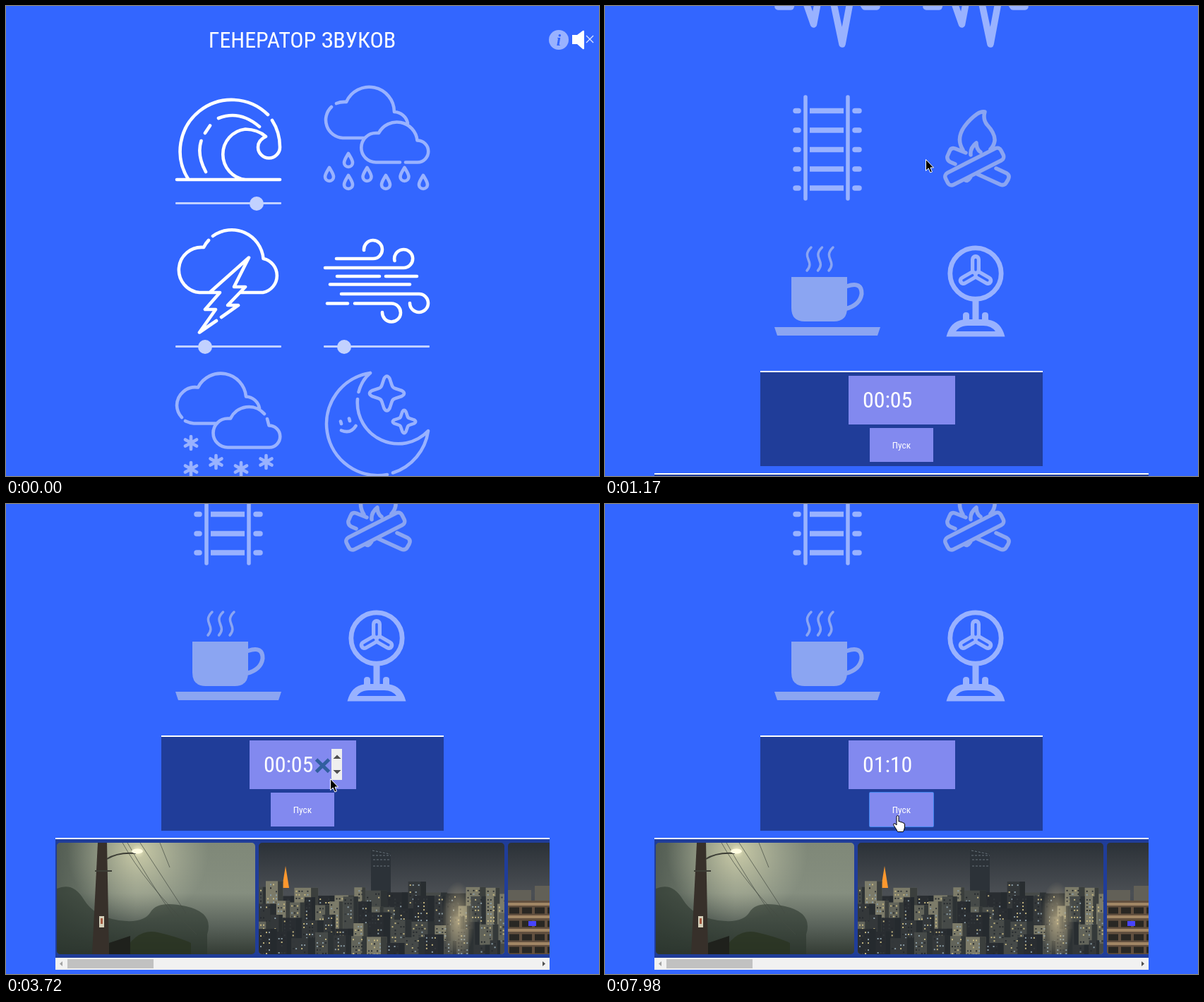
An HTML page for the animation above (8000 ms loop, 840x666 px).

```html
<!DOCTYPE html>
<html lang="ru">
<head>
<meta charset="utf-8">
<title>Генератор звуков</title>
<style>
  html, body { margin: 0; width: 100%; height: 100%; overflow: hidden; background: #36f; }
  svg { display: block; }
  text { font-family: "Roboto Condensed", Roboto, sans-serif; font-stretch: 75%; fill: #fff; }
  .line { fill: none; stroke-width: 4.6; stroke-linecap: round; stroke-linejoin: round; }
  .on { stroke: #fff; }
  .dim { stroke: #99b2ff; }
  .label { font: bold 11.4px "Noto Sans Mono", "DejaVu Sans Mono", monospace; fill: #99b2ff; }
  .digits { font-size: 32px; text-anchor: middle; }
  .soft { stroke: #8ba5f2; }
  .focus { fill: none; stroke: #3f86ee; }
</style>
</head>
<body>
<svg width="840" height="666" viewBox="0 0 840 666">
<defs>
  <path id="drop" d="M0-9C3-4 6 0 6 4A6 6 0 0 1-6 4C-6 0-3-4 0-9Z"/>
  <path id="flake" d="M0-9V9M-8-4.6L8 4.6M-8 4.6L8-4.6"/>
  <path id="star" vector-effect="non-scaling-stroke" d="M-4-21Q0-28 4-21L7-12Q8-8 12-7L21-4Q28 0 21 4L12 7Q8 8 7 12L4 21Q0 28-4 21L-7 12Q-8 8-12 7L-21 4Q-28 0-21-4L-12-7Q-8-8-7-12Z"/>
  <path id="noise" class="line dim" style="stroke-width:9.5" d="M455 551H473L484.500 516 505.500 576 522 490 546 604 561 524 578 551H595"/>
  <path id="steam" d="M292 342C277 357 298 361 286 375"/>
  <linearGradient id="fog" x2="0" y2="1"><stop stop-color="#7f8878"/><stop offset=".45" stop-color="#858e7f"/><stop offset=".75" stop-color="#59625a"/><stop offset="1" stop-color="#343c34"/></linearGradient>
  <linearGradient id="shade"><stop stop-color="#2f3a34" stop-opacity=".55"/><stop offset=".4" stop-color="#2f3a34" stop-opacity="0"/></linearGradient>
  <radialGradient id="glow"><stop stop-color="#fffbd0" stop-opacity=".9"/><stop offset=".1" stop-color="#e4e2b8" stop-opacity=".65"/><stop offset="1" stop-color="#c8ccb0" stop-opacity="0"/></radialGradient>
  <linearGradient id="sky" x2="0" y2="1"><stop stop-color="#2b3137"/><stop offset=".45" stop-color="#4b4f54"/><stop offset="1" stop-color="#34363a"/></linearGradient>
  <radialGradient id="street"><stop stop-color="#d9c79a" stop-opacity=".7"/><stop offset="1" stop-color="#d9c79a" stop-opacity="0"/></radialGradient>
  <clipPath id="frames"><rect x="72" y="480" width="281" height="158" rx="5"/><rect x="358" y="480" width="348" height="158" rx="5"/><path d="M770 480H716Q711 480 711 485V633Q711 638 716 638H770Z"/></clipPath>
</defs>

<g id="page">
  <text x="419.500" y="59" font-size="32" text-anchor="middle">ГЕНЕРАТОР ЗВУКОВ</text>
  <circle cx="783" cy="48" r="14" fill="#99b2ff"/>
  <text x="783" y="56" text-anchor="middle" style="font:italic bold 23px 'Liberation Serif',serif;fill:#36f">i</text>
  <path fill="#fff" d="M802 41H809L817 35Q819 34 819 36V60Q819 62 817 61L809 54H802Z"/>
  <path stroke="#dde6ff" stroke-width="1.300" d="M822 42L832 52M832 42L822 52"/>

  <!-- wave, storm, wind -->
  <path class="line on" d="M242 246H388M258 245A73 73 0 0 1 371 154M377 162Q388 179 388 200A15.500 15.500 0 0 1 357 200Q357 190 368 185Q357 175 339 174.500A36 36 0 0 0 339 246M283 235Q270 211 276.500 191M282 180L289 169.500M301 159Q331 147 359 171"/>
  <path class="line on" d="M287 332Q283 336 280 342A32 32 0 1 0 274 406H303L282 430H297L274 462.500 298 446M305 441L329 424H314L339 398H323L344 356.500 289 405.500M293 326A45 45 0 0 1 364.500 358A24.500 24.500 0 0 1 364 406H333"/>
  <path class="line on" d="M468 358H520A13 13 0 1 0 507 346M452 371H563A13 13 0 1 0 550.500 361M469 383H529M538 383H582M459 394.500H572M475 408H585A13 13 0 1 1 572 421M455 421.500H484M494 421.500H546A13 13 0 1 1 533 434"/>
  <g id="sliders" fill="#c2d1ff"></g>

  <!-- rain, snow, moon -->
  <g class="line dim">
    <path d="M508 187H477A25.500 25.500 0 0 1 461 143M468 138Q474 135.500 482 136A35.500 35.500 0 0 1 550 150A20 20 0 0 1 569 166M558 221.500H524A20.500 20.500 0 0 1 524 180H528A29 29 0 0 1 582.500 190.500A15.500 15.500 0 0 1 583 221.500H566"/>
    <g id="drops"></g>
    <path d="M299 591.500H266Q260 591 254 588M249 583A26 26 0 0 1 242 566A26 26 0 0 1 272 540.500A36 36 0 0 1 340 553.500A20 20 0 0 1 359 570M370 585L372.500 594.500A15.500 15.500 0 0 1 373 625.500H314A20.500 20.500 0 0 1 314 584.500H318A29 29 0 0 1 366 578"/>
    <g id="flakes"></g>
    <path d="M516 520A73 73 0 1 0 540 664M548 661.500A73 73 0 0 0 598 602A58 58 0 0 1 498 557M499.500 547Q504 530 516 520M474 588.500L475 592M486 584.500L487 588M475 601.500Q488 607 495.500 595"/>
    <use href="#star" x="539.500" y="549"/>
    <use href="#star" transform="translate(564 589)scale(.66)"/>
  </g>

  <!-- hail and noise -->
  <g transform="translate(0 249)">
    <g class="line dim">
      <path d="M249.500 510Q258 499.500 279 499A45 45 0 0 1 364 516A24.500 24.500 0 0 1 364 564H274A32 32 0 0 1 246 517M376.500 584A9 9 0 1 0 372.500 589.700"/>
      <g id="hail"></g>
    </g>
    <g id="noises"></g>
  </g>

  <!-- rails, campfire, cup, fan -->
  <g transform="translate(0 1002)">
    <g class="line dim">
      <path style="stroke-width:5.500" d="M284 129V273M344 129V273"/>
      <g id="rungs" stroke-width="7.500"></g>
    </g>
    <g class="line soft" stroke-width="5">
      <path style="stroke-width:5.500" d="M507 204Q497 188 509 171Q517 160 527 153Q533 149 538 150Q535 160 541 168Q553 181 552 191Q551 198 546 203M518 211Q517 201 526 194Q526 203 532 207M511 208L496 202Q490 200 488 206L485 213Q484 218 489 221L496 224M554 230L569 237Q574 240 571 246L568 251Q565 255 560 253L527 238"/>
      <rect x="-44" y="-10" width="88" height="19" rx="6" style="stroke-width:5.500" transform="translate(523.500 228)rotate(-27)"/>
      <path d="M509 246Q513 251 518 243"/>
    </g>
    <path fill="#8ba5f2" d="M264 384H343V428Q343 447 324 447H283Q264 447 264 428ZM240 455H390L386 467H244Z"/>
    <g class="line soft">
      <path style="stroke-width:6" d="M343 397Q364 390 363.500 408Q361 424 341 429"/>
      <g style="stroke-width:3.500"><use href="#steam"/><use href="#steam" x="15.500"/><use href="#steam" x="31"/></g>
    </g>
    <circle class="dim" cx="525" cy="379" r="36.200" fill="none" stroke-width="6.800"/>
    <g id="blades" transform="translate(525 379)" stroke-linecap="round"></g>
    <path fill="#99b2ff" fill-rule="evenodd" d="M520.500 417H529.500V444H534V438Q534 434 538.500 434T543 438V444.500Q561 447 566.500 468.500H483.500Q489 447 507 444.500V438Q507 434 511.500 434T516 438V444H520.500ZM497 461H553Q547 453 536 453H514Q503 453 497 461Z"/>
  </g>

  <!-- timer and photo strip -->
  <g transform="translate(0 1191)">
    <path fill="#203d99" d="M220 330H620V463H220ZM70 475H770V660H70Z"/>
    <path fill="#fff" d="M220 328H620V330H220ZM70 473H770V475H70Z"/>
    <path fill="#8289ef" d="M345 335H496V404H345ZM375 409H465V457H375Z"/>
    <rect id="inputFocus" class="focus" x="344.500" y="334.500" width="152" height="70"/>
    <rect id="buttonFocus" class="focus" x="374.500" y="408.500" width="91" height="49" rx="1"/>
    <rect id="selection" y="350" width="31" height="39" fill="#b3d7ff"/>
    <g class="digits">
      <text id="minutes" x="380.700" y="380"></text><text x="400.300" y="380">:</text><text id="seconds" x="419.500" y="380"></text>
    </g>
    <g id="controls">
      <path stroke="#315f9f" stroke-width="5" d="M439.500 362L457.500 379.500M457.500 362L439.500 379.500"/>
      <path fill="#efefef" d="M461 347H476V391H461Z"/>
      <path fill="#505050" d="M463.500 361L469 355.500 474.500 361ZM463.500 377L469 382.500 474.500 377Z"/>
    </g>
    <text x="420" y="438" font-size="13.333" text-anchor="middle">Пуск</text>

    <g clip-path="url(#frames)">
      <path fill="url(#fog)" d="M72 480H353V638H72Z"/>
      <path fill="url(#shade)" d="M72 480H353V638H72Z"/>
      <circle cx="187" cy="492" r="100" fill="url(#glow)"/>
      <path fill="#28332b" opacity=".55" d="M72 545Q95 535 110 560T160 590T205 578T255 570T285 610V638H72Z"/>
      <path fill="#29321f" opacity=".7" d="M165 638Q185 600 215 607T262 622V638Z"/>
      <path fill="none" stroke="#454c44" d="M165 480Q195 535 270 610M172 480Q200 530 240 588M190 480L255 580M218 480L232 515" opacity=".7"/>
      <path fill="#37302a" d="M130 480H143L146 638H122Z"/>
      <path fill="none" stroke="#3d3e36" stroke-width="2" d="M143 503Q158 493 184 495M126 520H150M146 630H176"/>
      <ellipse cx="186" cy="492" rx="8" ry="3.500" fill="#fffce0"/>
      <path fill="#d5cfb9" d="M132 584H139V600H132Z"/><path fill="#a65b41" d="M134 587H137V595H134Z"/>
      <path fill="#1f211c" d="M146 622L176 612V638H146Z"/>

      <path fill="url(#sky)" d="M358 480H706V638H358Z"/>
      <path fill="#2c3238" d="M517 489L545 494V560H517Z"/>
      <path fill="none" stroke="#87959e" stroke-dasharray="3 2" d="M519 491L544 496M519 498H545M520 504H545M520 513H545" opacity=".65"/>
      <path fill="#ff982e" d="M396 513L401 544H391Z"/>
      <g id="city"></g>
      <ellipse cx="640" cy="590" rx="24" ry="55" fill="url(#street)"/>

      <path fill="url(#sky)" d="M711 480H770V638H711Z"/>
      <path fill="#626057" d="M711 547H744V638H711ZM749 541H770V638H749Z"/>
      <path fill="#62503f" d="M711 562H770V638H711Z"/>
      <path stroke="#a18665" stroke-width="4" d="M711 567H770M711 585H770M711 604H770M711 623H770"/>
      <path stroke="#292723" stroke-width="9" stroke-dasharray="14 4" d="M713 576H770M713 595H770M713 614H770M713 632H770"/>
      <path fill="#4744ff" d="M740 591H751V598H740Z"/>
    </g>
    <path fill="#f1f1f1" d="M70 643H770V660H70Z"/>
    <path fill="#c1c1c1" d="M87 645H209V658H87Z"/>
    <path fill="#a3a3a3" d="M80 648V655L76 651.500Z"/><path fill="#505050" d="M760 648V655L764 651.500Z"/>
  </g>
</g>

<g id="cursor">
  <path id="arrow" fill="#000" stroke="#fff" d="M.5.5V16.500L4.200 13L6.800 19L9.400 18L7 12H11.500Z"/>
  <path id="hand" transform="translate(-7 0)" fill="#fff" stroke="#000" d="M6 14V2.500Q6 .5 7.500.5T9 2.500V9Q11.500 8 12 10Q14.500 9 15 11Q17.500 10.500 17.500 13V17Q17 20 15.500 23.500H7.500Q6 20 3 16Q.5 13 2 12Q4 11 6 14Z"/>
</g>
</svg>

<script>
const $ = id => document.getElementById(id);
const fill = (id, items, draw) => { $(id).innerHTML = items.map(draw).join(''); };
const box = (x, y, w, h, color) => `<rect x="${x}" y="${y}" width="${w}" height="${h}" fill="${color}"/>`;

fill('sliders', [[240, 280, 355], [240, 483, 282], [450, 483, 479]], ([x, y, thumb]) =>
  `<rect x="${x}" y="${y - 2}" width="150" height="3" rx="1"/><circle cx="${thumb}" cy="${y}" r="10"/>`);
fill('drops', [[458, 238], [485, 218], [485, 249], [511.5, 238], [538, 249], [564.5, 238], [591, 249]],
  ([x, y]) => `<use href="#drop" x="${x}" y="${y}"/>`);
fill('flakes', [[262, 619], [262, 656], [297.5, 646], [333, 656], [368.5, 646]],
  ([x, y]) => `<use href="#flake" x="${x}" y="${y}"/>`);
fill('hail', [[262.5, 582], [297.5, 582], [332.5, 582], [280, 610], [315, 610], [349.5, 610]],
  ([x, y]) => `<circle cx="${x}" cy="${y}" r="9"/>`);
fill('noises', [['Pink', 0, 0], ['White', -210, 203], ['Brown', 0, 203]], ([name, x, y]) =>
  `<g transform="translate(${x} ${y})"><use href="#noise"/><text class="label" x="450" y="482">${name}</text><text class="label" x="450" y="493.5">Noise</text></g>`);
fill('rungs', [148.5, 176, 203.5, 231, 258], y =>
  `<path style="stroke-width:7.5" d="M270 ${y}H274M354 ${y}H360"/><path style="stroke-width:7.5;stroke-linecap:butt" d="M290 ${y}H338"/>`);
const blades = (from, to, width, color) => [0, 120, 240].map(a =>
  `<path transform="rotate(${a})" stroke="${color}" stroke-width="${width}" d="M0 ${-from}V${-to}"/>`).join('');
$('blades').innerHTML = blades(0, 20, 14, '#99b2ff') + blades(5, 19.5, 3.5, '#36f');

// Night skyline: rows of buildings with lit windows, nearer rows lower down.
let seed = 11;
const random = () => (seed = seed * 16807 % 2147483647) / 2147483647;
const pick = list => list[Math.floor(random() * list.length)];
let city = '';
for (let row = 0; row < 4; row++) {
  for (let x = 354; x < 706;) {
    const w = 14 + random() * 20, y = 532 + row * 23 + random() * 24;
    city += box(x, y, w, 638 - y, pick(['#34383a', '#464a48', '#62645a', '#7c7b69', '#292d31']));
    city += box(x + w * .7, y, w * .3, 638 - y, '#24292dbb');
    for (let wy = y + 4; wy < y + 42; wy += 5)
      for (let wx = x + 2; wx < x + w * .65; wx += 4)
        if (random() < .6) city += box(wx, wy, 2, 2, pick(['#25292d', '#33383b', '#c5b781', '#8b9da6']));
    x += w;
  }
}
$('city').innerHTML = city;

const LOOP = 8000, STEP = 30;
const FOCUS = 4680, NEXT_FIELD = 5670, START = 7980;
const ease = u => u * u * (3 - 2 * u);
const scrollKeys = [[420.5, 0], [600, 500], [750, 500], [1020, 1000], [1156, 1000], [1380, 1191]];
const cursorKeys = [
  [30, 836, 52], [390, 456, 217], [600, 456, 217], [1170, 454, 217], [1380, 453, 217],
  [1950, 453, 217], [2220, 407, 316], [2370, 407, 316], [2550, 393, 340], [2820, 435, 378],
  [2910, 432, 384], [3030, 432, 384], [3300, 426, 415], [3420, 426, 415], [3840, 467, 382],
  [3930, 467, 370], [4170, 467, 370], [4590, 381, 371], [4950, 381, 371], [5100, 385, 341],
  [7590, 385, 341], [7800, 414, 441]
];

function sample(keys, t) {
  const i = keys.findIndex(key => key[0] > t);
  if (i < 0) return keys[keys.length - 1].slice(1);
  if (i === 0) return keys[0].slice(1);
  const [start, ...from] = keys[i - 1], [end, ...to] = keys[i];
  const u = ease((t - start) / (end - start));
  return from.map((v, k) => Math.round(v + (to[k] - v) * u));
}
const show = (id, visible) => $(id).setAttribute('visibility', visible ? 'visible' : 'hidden');
const within = (x, y, left, top, right, bottom) => x >= left && x < right && y >= top && y < bottom;

function render(time) {
  const t = Math.floor(time % LOOP / STEP) * STEP;
  const [scroll] = sample(scrollKeys, t), [x, y] = sample(cursorKeys, t);
  $('page').setAttribute('transform', `translate(0 ${-scroll})`);
  $('cursor').setAttribute('transform', `translate(${x} ${y})`);

  const settled = t >= 1380;
  const overButton = settled && within(x, y, 375, 409, 465, 457);
  show('arrow', t >= 60 && !overButton);
  show('hand', overButton);

  const focused = t >= FOCUS && t < START, second = t >= NEXT_FIELD;
  show('controls', focused || settled && within(x, y, 345, 335, 496, 404));
  show('inputFocus', focused);
  show('buttonFocus', t >= START);
  show('selection', focused);
  $('selection').setAttribute('x', second ? 404 : 365);
  $('minutes').textContent = second ? '01' : '00';
  $('seconds').textContent = t < 6780 ? '05' : t < 6840 ? '01' : '10';
  $('minutes').style.fill = focused && !second ? '#000' : '#fff';
  $('seconds').style.fill = focused && second ? '#000' : '#fff';
}

const began = performance.now();
(function tick() {
  render(performance.now() - began);
  requestAnimationFrame(tick);
})();
</script>
</body>
</html>
```
